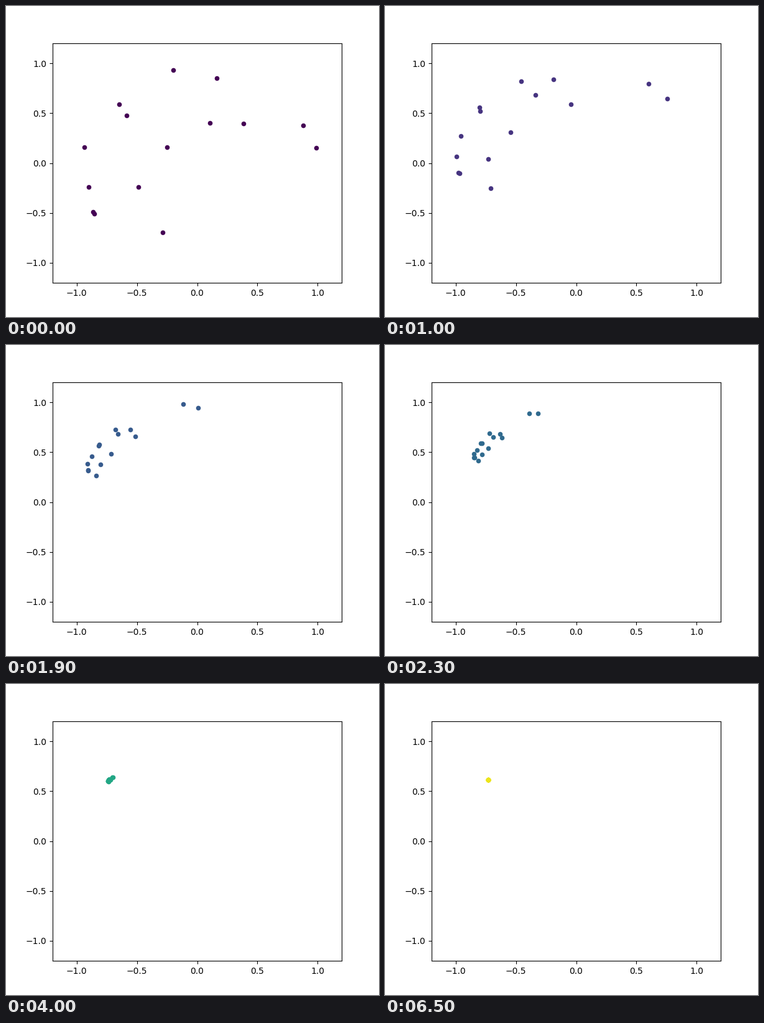
These frames come from a looping animation (600 by 500 pixels, 6700 ms). A matplotlib script:

```python
import numpy as np
import matplotlib.pyplot as plt
from matplotlib.animation import FuncAnimation

FRAMES = 67
DT = 10 / (FRAMES - 1)

# starting points on the unit sphere, seen along z
FRONT = [(-0.201, 0.929), (0.165, 0.848), (0.387, 0.393), (-0.248, 0.162),
         (-0.490, -0.237), (-0.867, -0.492), (-0.852, -0.505), (-0.289, -0.692)]
BACK = [(-0.650, 0.592), (-0.588, 0.480), (0.108, 0.405), (0.882, 0.380),
        (0.987, 0.155), (-0.939, 0.156), (-0.903, -0.237)]


def lift(points, side):
    """Place flat points on the front (+1) or back (-1) half of the sphere."""
    xy = np.array(points)
    z = side * np.sqrt(1 - (xy ** 2).sum(axis=1))
    return np.column_stack([xy, z])


def velocity(p):
    """Pull of each point towards its softmax-weighted mean, along the sphere."""
    w = np.exp(p @ p.T)
    pull = w @ p / w.sum(axis=1, keepdims=True)
    return pull - (pull * p).sum(axis=1, keepdims=True) * p


def step(p):
    """One Runge-Kutta step, kept on the sphere."""
    a = velocity(p)
    b = velocity(p + DT / 2 * a)
    c = velocity(p + DT / 2 * b)
    d = velocity(p + DT * c)
    p = p + DT / 6 * (a + 2 * b + 2 * c + d)
    return p / np.linalg.norm(p, axis=1, keepdims=True)


path = [np.vstack([lift(FRONT, 1), lift(BACK, -1)])]
while len(path) < FRAMES:
    path.append(step(path[-1]))

fig, ax = plt.subplots(figsize=(6, 5), dpi=100)
ax.set(xlim=(-1.2, 1.2), ylim=(-1.2, 1.2))
ax.set_xticks(np.arange(-1, 1.1, 0.5))
ax.set_yticks(np.arange(-1, 1.1, 0.5))
dots = ax.scatter(*path[0][:, :2].T, s=20)


def draw(i):
    dots.set_offsets(path[i][:, :2])
    dots.set_color(plt.cm.viridis(i / FRAMES))
    return dots,


anim = FuncAnimation(fig, draw, frames=FRAMES, interval=100, repeat=True,
                     repeat_delay=0)
plt.show()
```
